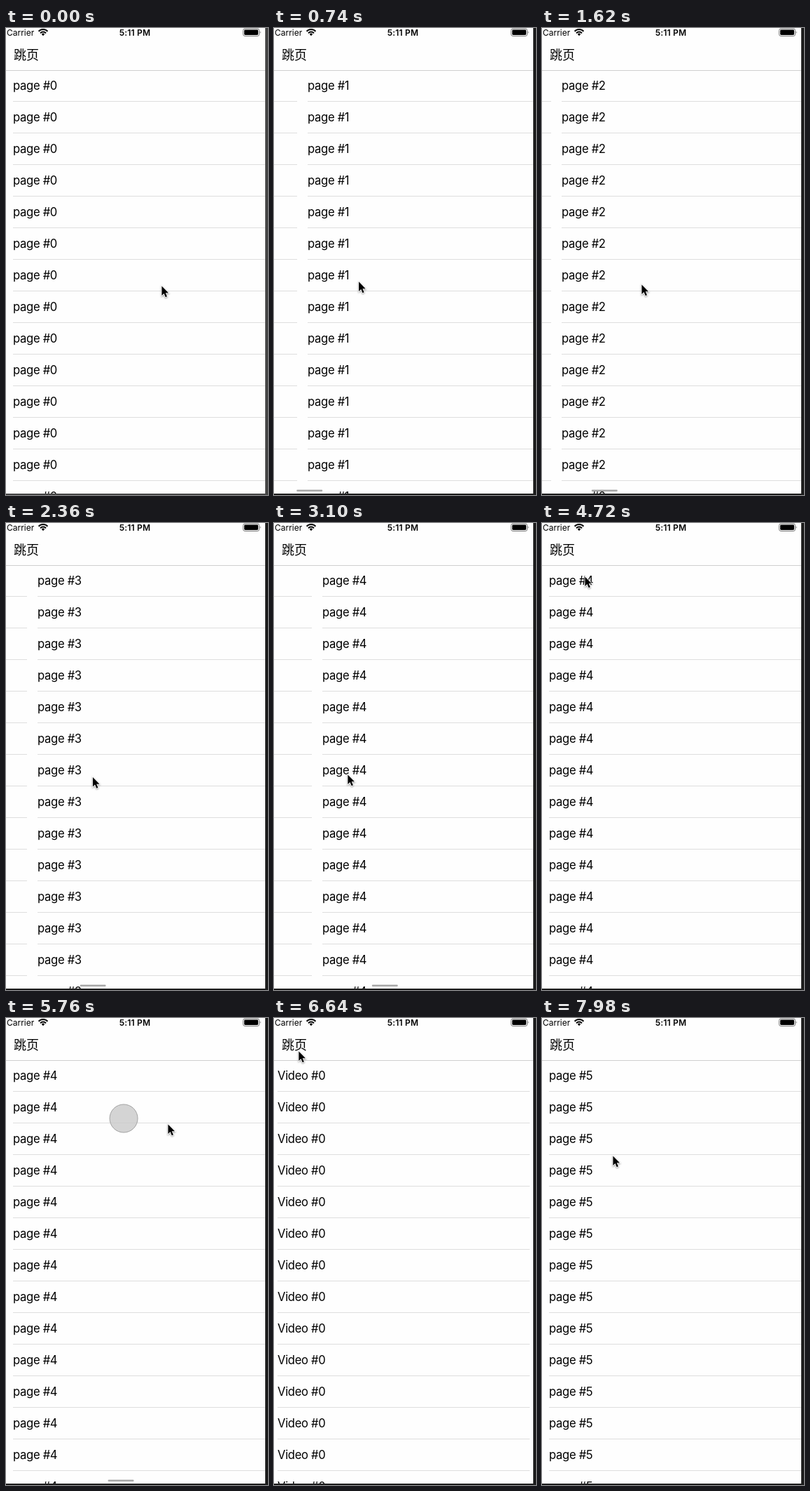
Write an HTML page that moves like this. It is 374x665 px and loops after 8 s.

```html
<!DOCTYPE html>
<html lang="zh">
<head>
<meta charset="utf-8">
<title>跳页</title>
<style>
  html, body { margin: 0; width: 100%; height: 100%; overflow: hidden; background: #fefefe; }
  svg { display: block; font-family: Inter, "Liberation Sans", sans-serif; }
  .row { font-size: 16.6px; letter-spacing: -.3px; }
  .status { font-size: 12px; }
  .title { font: 18px "Noto Sans CJK SC", "Noto Sans CJK", sans-serif; }
  #cursor { filter: drop-shadow(0 1px 1px rgba(0, 0, 0, .4)); }
</style>
</head>
<body>
<svg width="374" height="665" viewBox="0 0 374 665">
  <rect width="374" height="665" fill="#fefefe"/>
  <g id="strip"></g>
  <rect id="bar" y="657.5" width="37" height="2.5" rx="1.25" fill="#000" fill-opacity=".35"/>

  <rect y="60" width="370" height="1" fill="#cfcfcf"/>
  <text class="title" x="11" y="44.5">跳页</text>
  <text class="status" x="1" y="10.5">Carrier</text>
  <text class="status" x="184" y="10.5" text-anchor="middle" font-weight="600" letter-spacing=".2">5:11 PM</text>
  <g fill="none" stroke="#000" stroke-width="2">
    <path d="M46.6 4.8a8.7 8.7 0 0 1 12.8 0M49 7.3a5.4 5.4 0 0 1 8 0"/>
    <path d="M53 11.2l-2.2-2.4a3 3 0 0 1 4.4 0z" fill="#000" stroke="none"/>
  </g>
  <rect x="338.5" y="1" width="23" height="10.5" rx="2.6" fill="none" stroke="#777"/>
  <rect x="340" y="2.5" width="20" height="7.5" rx="1.4"/>
  <path d="M362.7 4.6q2 1.6 0 3.3z" fill="#777"/>

  <circle id="touch" r="20" fill="#cbcbcb" fill-opacity=".82" stroke="#a3a3a3"/>
  <path id="edge" d="M370 0h4v665H0v-2h370z"/>
  <path id="cursor" d="M0 0V13.6l3.1-2.9 2.2 5.1 2.2-.9-2.2-5.1h4.3z"
        stroke="#fff" stroke-width="1.6" paint-order="stroke"/>
</svg>
<script>
const LOOP = 8000, STEP = 147.75, LEAD = 12;   // the screen refreshes once per STEP
const PITCH = 375, ROW = 45;
const VIDEO = 6 + 5 / PITCH, JUMP = 45;        // the jump lands 5 px past the page edge
const $ = id => document.getElementById(id);
const mix = (a, b, k) => a + (b - a) * k;
const clamp = v => Math.min(1, Math.max(0, v));
const easeOut = x => 1 - (1 - x) ** 2;

// Times below are in steps. Four even swipes forward, then a few quick ones.
const starts = [0, 1, 2, 3].map(i => 1.465 + 5.465 * i);
const swipes = [
  ...starts.map((start, i) => ({ start, len: 5.2, from: i, to: i + 1 })),
  { start: 23.3, len: 3, from: 4, to: 5 },
  { start: 28.4, len: 3, from: 5, to: 4 },
  { start: 39.3, len: 3, from: 4, to: 3 },
  { start: JUMP, len: 0, from: VIDEO, to: VIDEO },
  { start: 47.5, len: 3, from: VIDEO, to: 5 }
];
const drags = swipes.filter(s => s.len);

// Pointer keys: step, x, y. Each even swipe repeats press, release, rest, return.
const stroke = s => [[s - .5, 222, 367], [s + 1.3, 105, 358], [s + 3.14, 105, 358], [s + 4.07, 142, 365]];
const pointer = [
  ...starts.flatMap(stroke),
  [23, 200, 340], [24.6, 92, 320], [27.5, 71, 276], [28, 98, 278], [29.7, 186, 270],
  [32, 61, 76], [35, 35, 47], [36.5, 35, 47], [38.5, 168, 143], [39, 231, 151],
  [40.5, 256, 150], [43, 35, 47], [JUMP, 35, 47], [48.7, 195, 190], [52, 112, 188], [54, 101, 196]
];

function pageMarkup(name, index) {
  let out = `<g transform="translate(${index * PITCH} 0)">`;
  for (let i = 0; i < 14; i++) {
    const y = 88 + i * ROW;
    out += `<text class="row" x="10" y="${y}">${name}</text>` +
      `<rect x="10" y="${y + 16}" width="360" height="1" fill="#dedede"/>`;
  }
  return out + "</g>";
}

const names = Array.from({ length: 6 }, (_, i) => `page #${i}`).concat("Video #0");
$("strip").innerHTML = names.map(pageMarkup).join("");

function pageAt(n) {
  const s = swipes.findLast(s => n >= s.start);
  return s ? mix(s.from, s.to, s.len ? easeOut(clamp((n - s.start) / s.len)) : 1) : 0;
}

// The scroll bar shows as a drag begins and fades once the page settles.
function barAlpha(n) {
  return Math.max(...drags.map(s =>
    n < s.start - .3 ? 0 : clamp(1 - (n - s.start - s.len) / .6)));
}

function pointerAt(n) {
  const i = Math.max(1, pointer.findIndex(k => k[0] >= n));
  const [a, ax, ay] = pointer[i - 1], [b, bx, by] = pointer[i];
  const k = clamp((n - a) / (b - a));
  return [mix(ax, bx, k), mix(ay, by, k)];
}

// The touch disc trails the pointer by half a step.
function drawTouch(n) {
  const on = drags.some(s => n >= s.start - .5 && n <= s.start + 1.2);
  const [x, y] = pointerAt(n - .5);
  $("touch").setAttribute("visibility", on ? "visible" : "hidden");
  $("touch").setAttribute("transform", `translate(${x} ${y})`);
}

function draw(t) {
  const n = Math.floor((t + LEAD) / STEP);
  const page = pageAt(n), [x, y] = pointerAt(n);
  $("strip").setAttribute("transform", `translate(${Math.round(-page * PITCH)} 0)`);
  $("bar").setAttribute("x", 36.5 * page - .5);
  $("bar").setAttribute("opacity", barAlpha(n));
  $("edge").setAttribute("fill", n < 1 ? "#464646" : "#1d1d1d");
  $("cursor").setAttribute("transform", `translate(${x + .4} ${y + .4})`);
  drawTouch(n);
}

const begin = performance.now();
function tick() {
  draw((performance.now() - begin) % LOOP);
  requestAnimationFrame(tick);
}
tick();
</script>
</body>
</html>
```
